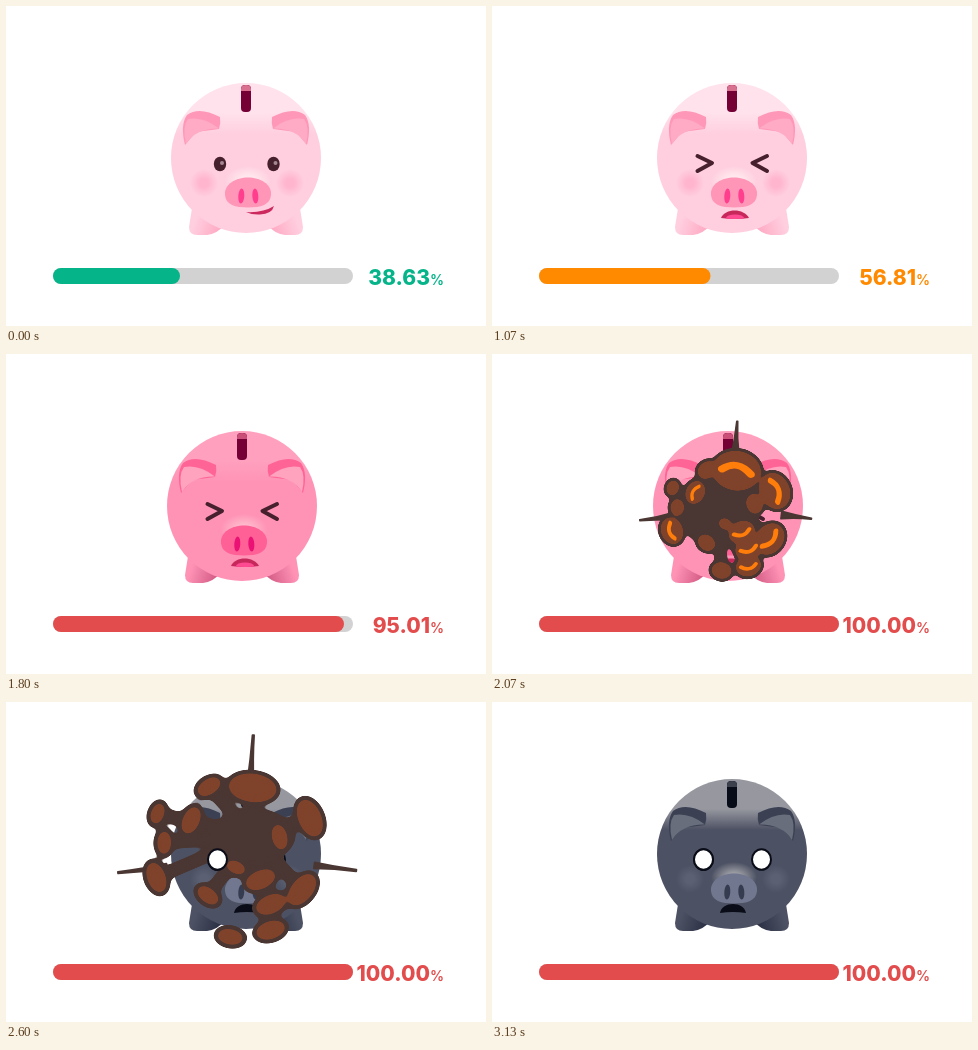
An HTML page for the animation above (3990 ms loop, 480 px wide and 320 px high).

```html
<!DOCTYPE html>
<html lang="en">
<head>
<meta charset="utf-8">
<title>Piggy bank progress</title>
<style>
html, body { margin: 0; width: 100%; height: 100%; overflow: hidden; background: #fff; }
svg { display: block; width: 480px; height: 320px; }
text { font: 800 21px Inter, Lato, sans-serif; }
.small { font-size: 14px; font-weight: 600; }
.mass { fill: #4a3632; stroke: #4a3632; stroke-linecap: round; }
.ember { fill: none; stroke: #ff7d0a; stroke-width: .34; stroke-linecap: round; }
</style>
</head>
<body>
<svg viewBox="0 0 480 320">
  <defs>
    <clipPath id="lips"><path d="M229 212C233 202 252 202 257 212Q243 214 229 212Z"/></clipPath>
    <filter id="goo" filterUnits="userSpaceOnUse" x="0" y="0" width="480" height="320" color-interpolation-filters="sRGB">
      <feGaussianBlur stdDeviation="3"/>
      <feColorMatrix values="1 0 0 0 0  0 1 0 0 0  0 0 1 0 0  0 0 0 12 -5"/>
    </filter>
  </defs>
  <g id="pig"></g>
  <g id="splat">
    <path id="spikes" class="mass" stroke-width="2" stroke-linejoin="round"/>
    <g id="mass" class="mass" filter="url(#goo)"></g>
    <g id="lobes" fill="#7f422a" filter="url(#goo)"></g>
    <g id="embers" class="ember"></g>
  </g>
  <g id="peek"></g>
  <rect x="47" y="262" width="300" height="16" rx="8" fill="#d2d2d2"/>
  <g id="meter">
    <rect id="fill" x="47" y="262" height="16" rx="8"/>
    <text id="value" x="424" y="278.500" text-anchor="end"></text>
    <text class="small" x="424" y="278.500">%</text>
  </g>
</svg>
<script>
const $ = id => document.getElementById(id);
const clamp = v => Math.max(0, Math.min(1, v));
const lerp = (a, b, k) => a + (b - a) * k;
const smooth = k => k * k * (3 - 2 * k);
const show = (id, v) => $(id).setAttribute('opacity', v);

// Piecewise linear track of [pose, value] keys
function track(keys, f) {
  let i = 1;
  while (i < keys.length - 1 && f > keys[i][0]) i++;
  const [a, u] = keys[i - 1], [b, v] = keys[i];
  return lerp(u, v, clamp((f - a) / (b - a)));
}

const both = (s, axis = 480) => s + `<g transform="matrix(-1 0 0 1 ${axis} 0)">${s}</g>`;

function pig(id, c) {
  const stop = (at, color, o = 1) => `<stop offset="${at}" stop-color="${color}" stop-opacity="${o}"/>`;
  return `<g id="${id}">
  <linearGradient id="${id}B" x2="0" y2="1">${stop(0, c.top)}${stop(.2, c.top)}${stop(.34, c.body)}</linearGradient>
  <linearGradient id="${id}L" x2="1" y2=".3">${stop(.3, c.leg)}${stop(1, c.shade)}</linearGradient>
  <radialGradient id="${id}C">${stop(.3, c.cheek)}${stop(1, c.cheek, 0)}</radialGradient>
  <radialGradient id="${id}G">${stop(.3, c.glow)}${stop(1, c.glow, 0)}</radialGradient>
  ${both(`<path fill="url(#${id}L)" d="M187 196L183 221Q183 229 191 229H201Q211 228 220 218Z"/>`)}
  <circle cx="240" cy="152" r="75" fill="url(#${id}B)"/>
  ${both(`<path fill="${c.ear}" d="M179 139Q174 119 181 109Q193 100 214 111Q215 117 213 123L190 126Z"/>
    <path fill="${c.inner}" d="M180 138Q176 121 182 113Q197 110 213 122.500Q190 122 180 138Z"/>`)}
  ${both(`<circle cx="198" cy="177" r="14" fill="url(#${id}C)"/>`, 482)}
  <ellipse cx="242" cy="175" rx="23" ry="15" fill="url(#${id}G)"/>
  <rect x="235" y="79" width="10" height="27" rx="4" fill="${c.slot}"/>
  <path fill="${c.cap}" d="M235 85V83Q235 79 240 79T245 83V85Z"/>
  <path fill="${c.snout}" d="M219 189C218 178 230 171.500 242 171.500S266 178 265 189C264 199 255 201.500 242 201.500S220 199 219 189Z"/>
  ${both(`<ellipse cx="235.300" cy="190" rx="3" ry="7.500" fill="${c.nostril}" transform="rotate(4 235 190)"/>`, 484.6)}
  </g>`;
}

const eye = x => `<ellipse cx="${x}" cy="158" rx="6.200" ry="7.300" fill="#47202e"/><circle cx="${x + 2}" cy="157" r="2" fill="#a58793"/>`;
const deadEye = x => `<ellipse cx="${x}" cy="157.500" rx="9.500" ry="10.300" fill="#fff" stroke="#0a0d18" stroke-width="2"/>`;

$('pig').innerHTML =
  pig('calm', { body: '#ffcfdf', top: '#ffe2eb', leg: '#ffcfdf', shade: '#ffaac4', ear: '#ff98b8', inner: '#ffabc6',
    cheek: '#ffb5cd', glow: '#ffe9ee', slot: '#740036', cap: '#d9708f', snout: '#ff96b7', nostril: '#ff3f8e' }) +
  pig('hot', { body: '#ff93b6', top: '#ffa0be', leg: '#ff93b6', shade: '#d45c86', ear: '#ff6496', inner: '#ffa3bf',
    cheek: '#ff93b6', glow: '#ffb9cb', slot: '#740036', cap: '#c94f78', snout: '#ff6096', nostril: '#ea1274' }) +
  pig('char', { body: '#4c5163', top: '#96979f', leg: '#4c5163', shade: '#2b3045', ear: '#3b4053', inner: '#696e7c',
    cheek: '#5b6073', glow: '#9a9ba2', slot: '#080b18', cap: '#3d404d', snout: '#71778f', nostril: '#363c50' }) +
  `<g id="happy">${eye(214)}${eye(267.5)}
    <path fill="#cc2a5e" d="M240 206Q257 207 268 200Q266 208 254 208.500Q246 209 240 206Z"/></g>
  <g id="pain"><g fill="none" stroke="#47202e" stroke-width="4" stroke-linecap="round" stroke-linejoin="round">
    ${both('<path d="M205.500 150L220 157L205.500 165"/>', 480.5)}</g>
    <g clip-path="url(#lips)"><path fill="#c7285c" d="M225 200H260V215H225Z"/><ellipse cx="243" cy="212" rx="9" ry="3.500" fill="#ff4a92"/></g></g>
  <g id="dead">${deadEye(211.5)}${deadEye(269.5)}
    <path fill="#0a0d18" d="M228 211C230 199 252 199 254 211Q241 209 228 211Z"/></g>`;
$('peek').innerHTML = deadEye(211.5);

// Splat lobes at full burst: x, y, radius
const center = [240, 155];
const lobes = [[246,104,29], [207,103,12], [297,131,22], [270,148,12], [161,127,9], [191,133,14], [167,153,10],
  [160,184,16], [206,200,11], [231,175,8], [290,195,20], [253,186,16], [262,208,16], [262,231,15], [226,237,12]];
const tips = [[247, 38], [117, 170], [346, 168]];

// Every lobe flies outward, is lifted a little, and flattens across its radius as k goes from 0 to 1
function placeLobe([x, y, r], k, size) {
  const [cx, cy] = center, push = lerp(1, 1.12, k);
  const px = cx + (x - cx) * push, py = cy + (y - cy) * push - 12 * k;
  const radius = lerp(r, 4 + r / 2, k) * size;
  const angle = Math.atan2(y - cy, x - cx) * 180 / Math.PI;
  const unit = rim => `translate(${px} ${py}) rotate(${angle}) scale(${radius * lerp(.9, .75, k) + rim} ${radius * lerp(1.12, 1.3, k) + rim})`;
  return { px, py, unit };
}

function spike([x, y], k, fade) {
  const [cx, cy] = center, reach = lerp(1, 1.04, k) * (1 - fade * .4);
  const dx = x - cx, dy = y - cy, len = Math.hypot(dx, dy);
  const at = (along, side) => `${cx + dx * along - dy / len * side} ${cy + dy * along + dx / len * side}`;
  const base = reach * .62, mid = reach * .8, w = lerp(5, 3, k) * (1 - fade);
  return `M${at(base, w)}Q${at(mid, w * .2)} ${at(reach, .7)}L${at(reach, -.7)}Q${at(mid, -w * .4)} ${at(base, -w)}Z`;
}

function drawSplat(f) {
  const on = f > 28 && f < 47;
  show('splat', on ? 1 : 0);
  if (!on) return;
  const grow = 1 - (1 - clamp((f - 28) / 6)) ** 2;
  const k = smooth(clamp((f - 34) / 5));
  const fade = clamp((f - 39) / 8), size = 1 - fade;
  const core = [lerp(222, 247, k), lerp(155, 134, k)];
  let mass = `<ellipse cx="${core[0]}" cy="${core[1]}" rx="${lerp(54, 42, k) * size}" ry="${lerp(52, 27, k) * size}"/>`;
  let brown = '', embers = '';
  for (const lobe of lobes) {
    const { px, py, unit } = placeLobe(lobe, k, size);
    const hold = lobe[1] > 220 ? 1 - k : 1; // the lowest lobes drip off
    mass += `<circle r="1" stroke="none" transform="${unit(4 * size)}"/>
      <path stroke-width="${lerp(lobe[2] * 1.4, 13, k) * size * hold}" d="M${core}L${px} ${py}"/>`;
    brown += `<circle r="1" transform="${unit(0)}"/>`;
    if (lobe[2] > 12) embers += `<path transform="${unit(0)}" d="M0 -.6Q.6 0 -.1 .6"/>`;
  }
  $('mass').innerHTML = mass;
  $('lobes').innerHTML = brown;
  $('embers').innerHTML = embers;
  $('spikes').setAttribute('d', tips.map(t => spike(t, k, fade)).join(''));
  $('splat').setAttribute('transform', `translate(${center}) scale(${grow}) translate(${center.map(v => -v)})`);
  show('embers', clamp((37 - f) / 2));
}

function draw(now) {
  // 15 poses per second
  const f = Math.floor((now % 3990 + 4) * 15 / 1000);
  const value = track([[11, 38.63], [21, 75], [27, 95.01], [29, 100]], f);
  const red = value > 84;
  $('value').textContent = value.toFixed(2);
  $('fill').setAttribute('width', track([[11, 127], [21, 216], [27, 291], [29, 300]], f));
  $('meter').setAttribute('fill', red ? '#e34c4c' : value > 50 ? '#ff8a00' : '#06b48a');

  const shake = red && f < 33 ? (f % 2 ? -4 : 4) : 0;
  const heat = clamp((f - 21) / 4), burnt = clamp((f - 32.6) / 4);
  $('pig').setAttribute('transform', `translate(${shake} 0)`);
  show('calm', heat < 1 ? 1 : 0);
  show('hot', burnt < 1 ? heat : 0);
  show('char', burnt);
  show('happy', value > 50 ? 0 : 1);
  show('pain', value > 50 && f < 35 ? 1 : 0);
  show('dead', f < 35 ? 0 : 1);
  show('peek', f > 36 ? 1 : 0);
  drawSplat(f);
}

const start = performance.now();
function tick() {
  draw(performance.now() - start);
  requestAnimationFrame(tick);
}
tick();
</script>
</body>
</html>
```
